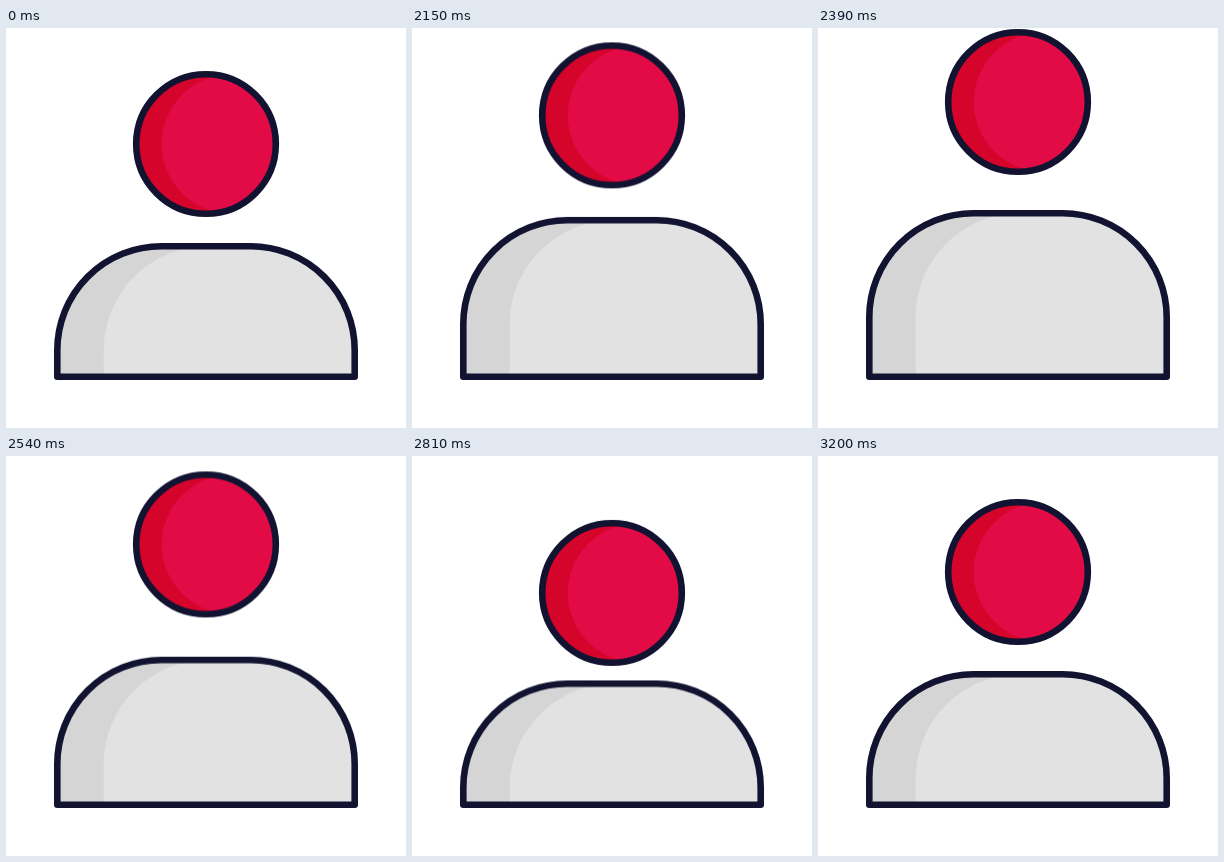
Animation of 400x400 px, one loop 3.23 s. Source, as an HTML page:

```html
<!DOCTYPE html>
<html lang="en">
<head>
<meta charset="utf-8">
<title>User icon</title>
<style>
  html, body { margin: 0; width: 100%; height: 100%; overflow: hidden; background: #fff; }
  svg { display: block; width: 100%; height: 100%; }
  .line { fill: none; stroke: #121331; stroke-width: 6.6; stroke-linecap: round; stroke-linejoin: round; }
  .head, .body { animation: 3230ms linear infinite; }
  .head { animation-name: head; }
  .body { animation-name: body; }

  /* Rest, jump up, sink below rest, settle */
  @keyframes head {
    0% { transform: translateY(0); }
    61.92% { transform: translateY(0); animation-timing-function: cubic-bezier(.33, 0, .13, 1); }
    73.994% { transform: translateY(-42px); animation-timing-function: cubic-bezier(.65, 0, .35, 1); }
    86.068% { transform: translateY(21px); animation-timing-function: cubic-bezier(.7, 0, .35, 1); }
    99.071%, 100% { transform: translateY(0); }
  }
  @keyframes body {
    0% { transform: translateY(0); }
    61.92% { transform: translateY(0); animation-timing-function: cubic-bezier(.2, .4, .2, 1); }
    73.994% { transform: translateY(-33px); animation-timing-function: cubic-bezier(.55, 0, .2, 1); }
    86.068% { transform: translateY(9.5px); animation-timing-function: cubic-bezier(.42, 0, .58, 1); }
    99.071%, 100% { transform: translateY(0); }
  }
</style>
</head>
<body>
<svg viewBox="0 0 400 400">
  <defs>
    <circle id="face" cx="200" cy="116" r="69.8"/>
    <path id="torso" d="M51.3 420V322A104 104 0 0 1 155.3 218.2H244.7A104 104 0 0 1 348.7 322V420"/>
    <clipPath id="inFace"><use href="#face"/></clipPath>
    <clipPath id="inTorso"><use href="#torso"/></clipPath>
    <clipPath id="aboveBase"><rect width="400" height="348.7"/></clipPath>
  </defs>

  <g clip-path="url(#aboveBase)">
    <g class="body">
      <use href="#torso" fill="#d5d5d5"/>
      <g clip-path="url(#inTorso)"><use href="#torso" x="46.4" fill="#e2e2e2"/></g>
      <use href="#torso" class="line"/>
    </g>
  </g>
  <path class="line" d="M51.3 348.7H348.7"/>

  <g class="head">
    <use href="#face" fill="#d4042b"/>
    <g clip-path="url(#inFace)"><use href="#face" x="25.5" fill="#e30b46"/></g>
    <use href="#face" class="line"/>
  </g>
</svg>
</body>
</html>
```
